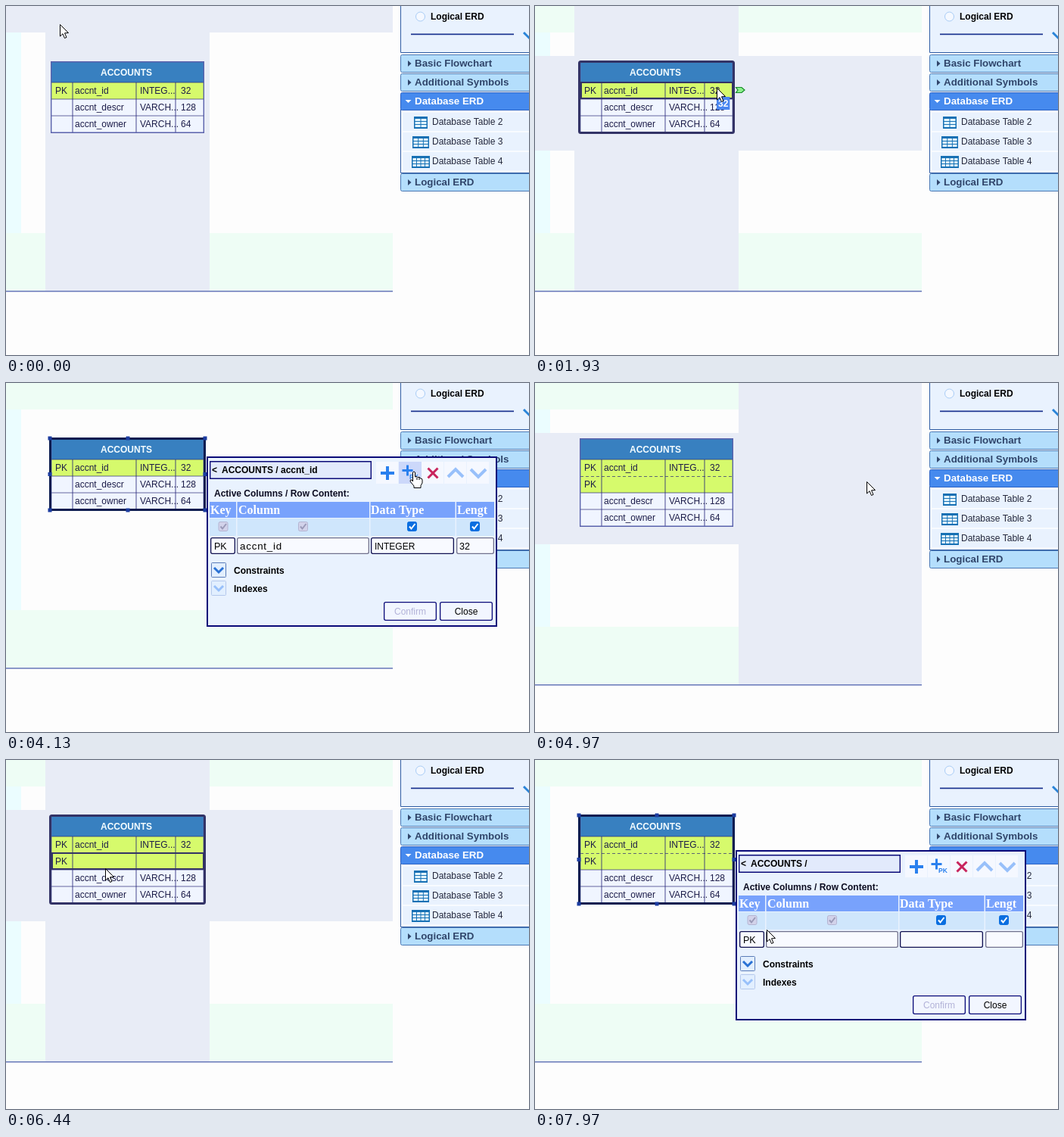
Recreate the animation shown at these times as an HTML page with a canvas. Size 691x461 px, loop 8000 ms.

```html
<!DOCTYPE html>
<html lang="en">
<head>
<meta charset="utf-8">
<title>Table editor</title>
<style>
html, body { margin: 0; width: 100%; height: 100%; overflow: hidden; background: #fdfdfd; }
canvas { display: block; }
</style>
</head>
<body>
<canvas id="stage" width="691" height="461"></canvas>
<script>
const ctx = document.getElementById('stage').getContext('2d');
const LOOP = 8000;
const SANS = '"Liberation Sans", Arial, sans-serif';
const SERIF = '"Liberation Serif", "Times New Roman", serif';
const NAVY = '#0a0a78', BLUE = '#2a80ee', FADED = '#98c0fa', PANEL = '#e9f2fe';
const WHITE = '#fdfdfd', MARGIN = '#eefdf5', SIDE = '#ebfdff', LANE = '#e8ecf6';
const GRID = 'rgba(40, 40, 120, .7)', OUTLINE = '#333366', TRIM = '#2f5ca4';

// time, x, y of the pointer tip
const PATH = [
  [0, 71, 24], [500, 80, 27], [1000, 140, 55], [1500, 232, 104], [1930, 240, 108],
  [2520, 240, 108], [2970, 366, 116], [3250, 370, 116], [3900, 537, 117], [4130, 539, 117],
  [4700, 539, 119], [5500, 160, 159], [5640, 153, 157], [6050, 153, 157], [6650, 123, 138],
  [7480, 123, 138], [7970, 306, 224]
];
const OPEN_1 = 2540, INSERT = 4380, OPEN_2 = 6850;
const COLS = [60, 88, 172, 224, 261];
const TEXT_X = [65, 91, 177, 231];
const ROWS = [
  ['PK', 'accnt_id', 'INTEG...', '32'],
  ['', 'accnt_descr', 'VARCH...', '128'],
  ['', 'accnt_owner', 'VARCH...', '64']
];
const NEW_ROW = ['PK', '', '', ''];

function fill(x1, y1, x2, y2, color) {
  ctx.fillStyle = color;
  ctx.fillRect(x1, y1, x2 - x1, y2 - y1);
}

function box(x1, y1, x2, y2, bg, border, radius = 0, width = 1) {
  ctx.beginPath();
  ctx.roundRect(x1 + width / 2, y1 + width / 2, x2 - x1 - width, y2 - y1 - width, radius);
  if (bg) { ctx.fillStyle = bg; ctx.fill(); }
  ctx.strokeStyle = border;
  ctx.lineWidth = width;
  ctx.stroke();
}

function text(str, x, y, color, { size = 12, bold = false, family = SANS, align = 'left', spacing = 0 } = {}) {
  ctx.font = `${bold ? 'bold ' : ''}${size}px ${family}`;
  ctx.textAlign = align;
  ctx.letterSpacing = spacing + 'px';
  ctx.fillStyle = color;
  ctx.fillText(str, x, y);
}

function line(points, color, width, dash = []) {
  ctx.beginPath();
  points.forEach(([x, y]) => ctx.lineTo(x, y));
  ctx.strokeStyle = color;
  ctx.lineWidth = width;
  ctx.setLineDash(dash);
  ctx.stroke();
  ctx.setLineDash([]);
}

function shape(points, bg, border, width = 1) {
  ctx.beginPath();
  points.forEach(([x, y]) => ctx.lineTo(x, y));
  ctx.closePath();
  ctx.fillStyle = bg;
  ctx.fill();
  if (border) {
    ctx.strokeStyle = border;
    ctx.lineWidth = width;
    ctx.stroke();
  }
}

function pointerAt(t) {
  const i = PATH.findIndex(p => p[0] > t);
  if (i < 0) return PATH[PATH.length - 1].slice(1);
  const [t0, x0, y0] = PATH[i - 1], [t1, x1, y1] = PATH[i];
  const k = (t - t0) / (t1 - t0), e = k * k * (3 - 2 * k);
  return [x0 + (x1 - x0) * e, y0 + (y1 - y0) * e];
}

const inside = (x, y, x1, y1, x2, y2) => x >= x1 && x < x2 && y >= y1 && y < y2;
const span = (stops, v) => stops.findIndex((s, i) => v >= s && v < stops[i + 1]);

function drawPage(grow, x, y, lit) {
  const bottom = 376 + grow;
  fill(0, 0, 691, 461, WHITE);
  fill(0, 0, 511, bottom, MARGIN);
  fill(0, 35, 20, 300 + grow, SIDE);
  fill(20, 35, 511, 300 + grow, WHITE);
  if (lit) {
    const xs = [0, 20, 52, 269, 511], ys = [0, 35, 66, 191 + grow, 300 + grow, bottom];
    const c = span(xs, x), r = span(ys, y);
    if (c >= 0 && r >= 0) {
      fill(0, ys[r], 511, ys[r + 1], LANE);
      fill(xs[c], 0, xs[c + 1], bottom, LANE);
    }
  }
  fill(0, bottom, 511, bottom + 1.6, '#6f7fbd');
}

function drawTable(rows, x, y, hover, selected) {
  const end = 101 + rows.length * 22;
  fill(60, 74, 262, end, '#f0f5ff');
  fill(60, 74, 262, 101, '#3880c0');
  text('ACCOUNTS', 159, 92, '#f4fcff', { bold: true, align: 'center' });
  rows.forEach((row, i) => {
    const top = 101 + i * 22;
    if (row[0]) fill(60, top, 262, top + 22, '#d6fa6c');
  });
  COLS.slice(1, 4).forEach(c => line([[c, 101], [c, end]], GRID, 1.2));
  rows.forEach((row, i) => {
    const top = 101 + i * 22;
    if (i && row[0]) line([[60, top + .5], [262, top + .5]], GRID, 1, [4, 3]);
    else line([[60, top], [262, top]], GRID, 1.2);
    row.forEach((s, c) => text(s, TEXT_X[c], top + 15, '#1c1c48'));
  });
  box(59, 73, 262, end + 1, null, '#5a62ac', 0, 1.4);

  if (selected) {
    box(57, 72, 264, end + 2, null, '#0c1c50', 0, 3);
    const mid = (73 + end + 1) / 2;
    for (const hx of [58, 161, 263]) {
      for (const hy of [73, mid, end + 1]) {
        if (hx !== 161 || hy !== mid) fill(hx - 2.5, hy - 2.5, hx + 2.5, hy + 2.5, '#1c3ca0');
      }
    }
  }
  if (!hover) return;
  box(57, 72, 264, end + 2, null, OUTLINE, 2, 3);
  const r = Math.floor((y - 101) / 22), c = span(COLS, x);
  if (!rows[r]) return;
  const top = 101 + r * 22;
  box(60, top - 1, 262, top + 22, null, OUTLINE, 0, 2);
  if (r === 0) {
    shape([[265.5, 107.5], [273, 107.5], [277, 111], [273, 114.5], [265.5, 114.5], [268, 111]], '#8cf08c', '#168a28', 1.2);
  }
  if (c >= 0 && rows[r][c]) {
    const left = COLS[c] + 16;
    ctx.font = 'bold 12px ' + SANS;
    ctx.letterSpacing = '0px';
    const w = ctx.measureText(rows[r][c]).width;
    fill(left, top + 19, left + w + 4, top + 36, '#4a86f0');
    text(rows[r][c], left + 2, top + 32, '#fff', { bold: true });
  }
}

function drawAccordion(label, y, open) {
  box(521, y, 700, y + 24, open ? '#468aee' : '#b4defc', open ? '#2c62c4' : '#4a78b4', 2);
  const ink = open ? '#fff' : '#30456a', m = y + 12;
  shape(open ? [[527.5, m - 2], [535.5, m - 2], [531.5, m + 2]]
             : [[531, m - 4], [535.5, m], [531, m + 4]], ink);
  text(label, 540, y + 16, ink, { size: 13.33, bold: true });
}

function drawSidebar() {
  box(521, -5, 700, 62, PANEL, TRIM);
  ctx.beginPath();
  ctx.arc(547.5, 14, 6, 0, 7);
  ctx.fillStyle = '#f4f8ff';
  ctx.fill();
  ctx.strokeStyle = '#a8ccf6';
  ctx.lineWidth = 1;
  ctx.stroke();
  text('Logical ERD', 561, 18, '#000', { bold: true });
  fill(535, 36.5, 671, 38.2, '#1c3490');
  line([[684, 35], [693, 44]], '#2a84d8', 3);

  box(521, 136, 700, 221, '#f8fbff', TRIM);
  drawAccordion('Basic Flowchart', 64);
  drawAccordion('Additional Symbols', 89);
  drawAccordion('Database ERD', 114, true);
  drawAccordion('Logical ERD', 221);
  for (let n = 2; n <= 4; n++) {
    const y = 153 + (n - 2) * 26, w = [18, 22, 24][n - 2], left = 548 - w / 2;
    fill(524, y - 12, 691, y + 12, PANEL);
    fill(left, y - 7, left + w, y + 9, '#1670b4');
    const cell = (w - 2 - n) / n;
    for (let c = 0; c < n; c++) {
      for (let r = 0; r < 3; r++) {
        const cx = left + 1.5 + c * (cell + 1), cy = y - 4 + r * 4;
        fill(cx, cy, cx + cell, cy + 3, '#e4f6ff');
      }
    }
    text('Database Table ' + n, 563, y + 4, '#24283c');
  }
}

function chevron(x, y, w, dir, color, width) {
  line([[x - w, y - w / 2 * dir], [x, y + w / 2 * dir], [x + w, y - w / 2 * dir]], color, width);
}

function plus(x, y, r, w) {
  fill(x - r, y - w / 2, x + r, y + w / 2, BLUE);
  fill(x - w / 2, y - r, x + w / 2, y + r, BLUE);
}

function checkbox(x, y, active) {
  box(x - 6.5, y - 6.5, x + 6.5, y + 6.5, active ? '#0a6ee0' : '#d2d2ea', active ? '#0a6ee0' : '#b4b4d2', 2);
  line([[x - 3.5, y], [x - 1, y + 3], [x + 4, y - 3.5]], active ? '#fff' : '#9a9ab8', 2);
}

function drawDialog(row, dy, hoverKey) {
  ctx.save();
  ctx.translate(0, dy);
  box(265, 97, 649, 322, PANEL, NAVY, 0, 2);
  box(269, 103, 483, 127, '#e2eafc', NAVY, 0, 1.4);
  text('<', 272, 119, '#000', { bold: true });
  text('ACCOUNTS / ' + row[1], 285, 119, '#000', { bold: true });

  for (let i = 0; i < 5; i++) fill(489 + i * 30, 104, 518 + i * 30, 133, '#f5f8ff');
  if (hoverKey) fill(519, 104, 549, 133, '#ccd8fa');
  plus(504, 119, 9, 4);
  plus(530.5, 115.5, 7, 3);
  text('PK', 533, 127, BLUE, { size: 8.5, bold: true });
  line([[557.5, 112.5], [570.5, 125.5]], '#c8245c', 3);
  line([[570.5, 112.5], [557.5, 125.5]], '#c8245c', 3);
  chevron(594, 119, 10, -1, FADED, 4);
  chevron(624, 119, 10, 1, FADED, 4);

  text('Active Columns / Row Content:', 275, 150, '#0c0c20', { bold: true });
  fill(269, 157, 645, 178, '#78a2fc');
  fill(269, 179, 645, 202, '#cfe6fc');
  [304, 480, 593.5].forEach(x => fill(x, 157, x + 1.5, 202, PANEL));
  [['Key', 270], ['Column', 307], ['Data Type', 482], ['Lengt', 596]].forEach(
    ([s, x]) => text(s, x, 173, '#fff', { size: 16, bold: true, family: SERIF }));
  [287, 392.5, 536.5, 619.5].forEach((x, i) => checkbox(x, 189.5, i > 1));

  const fields = [
    [270, 303, row[0], 275], [305, 480, row[1], 309],
    [482, 592, row[2] && 'INTEGER', 487], [595, 645, row[3], 599]
  ];
  fields.forEach(([x1, x2, s, tx], i) => {
    box(x1, 204, x2, 226, '#f8faff', i % 2 ? '#70708c' : '#101050', 2, 1.3);
    text(s, tx, 219.5, '#000', i === 1 ? { size: 13.33, spacing: .8 } : { size: i === 2 ? 12 : 12.5 });
  });

  [['Constraints', 237, '#2a72d4', '#5a7cb8'], ['Indexes', 261, FADED, '#b4c8ec']].forEach(([s, y, ink, edge]) => {
    box(271, y, 291, y + 20, '#e2efff', edge, 1);
    chevron(281, y + 10, 6, 1, ink, 3);
    text(s, 301, y + 15, '#000', { bold: true });
  });
  [['Confirm', 499, '#b2b2d8'], ['Close', 573, '#000']].forEach(([s, x, ink]) => {
    box(x, 289, x + 70, 314, '#f2f6ff', NAVY, 2, 1.3);
    text(s, x + 35, 306, ink, { align: 'center' });
  });
  ctx.restore();
}

function drawArrow() {
  shape([[.5, .5], [.5, 16], [4, 12.7], [6.5, 18.5], [9, 17.4], [6.5, 11.8], [11.5, 11.5]], '#fff', '#000');
}

function drawBeam() {
  line([[-3, -7.5], [-1, -7.5], [0, -6.5], [0, 6.5], [-1, 7.5], [-3, 7.5]], '#000', 1.2);
  line([[3, -7.5], [1, -7.5], [0, -6.5], [0, 6.5], [1, 7.5], [3, 7.5]], '#000', 1.2);
}

function drawHand() {
  shape([[-1.5, 1], [0, 0], [1.5, 1], [1.5, 7], [4, 6.5], [5, 7.5], [7.5, 7.5], [8.5, 9], [10.5, 9.5],
    [11, 11], [11, 15], [9, 18.5], [9, 21.5], [0, 21.5], [0, 19], [-5, 13], [-4.5, 11], [-3, 11], [-1.5, 13]],
    '#fff', '#000');
  [4, 7].forEach(x => line([[x, 7.5], [x, 11]], '#000', 1));
}

function drawPointer(x, y, kind) {
  ctx.save();
  ctx.translate(Math.round(x), Math.round(y));
  ({ arrow: drawArrow, beam: drawBeam, hand: drawHand })[kind]();
  ctx.restore();
}

function draw(t) {
  const [x, y] = pointerAt(t);
  const grown = t >= INSERT;
  const rows = grown ? [ROWS[0], NEW_ROW, ROWS[1], ROWS[2]] : ROWS;
  const grow = grown ? 22 : 0;
  const open = (t >= OPEN_1 && !grown) || t >= OPEN_2;
  const inDialog = open && inside(x, y, 265, 97 + grow, 649, 322 + grow);
  const onTable = inside(x, y, 58, 73, 264, 102 + rows.length * 22);
  const onKey = inDialog && inside(x, y, 519, 104 + grow, 549, 133 + grow);

  let kind = 'arrow';
  if (inDialog) {
    if (inside(x, y, 489, 104 + grow, 640, 133 + grow)) kind = 'hand';
    else if (inside(x, y, 269, 103 + grow, 483, 127 + grow)) kind = 'beam';
  }

  drawPage(grow, x, y, !inDialog);
  drawSidebar();
  drawTable(rows, x, y, onTable && !open, open);
  if (open) drawDialog(rows[grown ? 1 : 0], grow, onKey);
  drawPointer(x, y, kind);
}

function tick() {
  draw(performance.now() % LOOP);
  requestAnimationFrame(tick);
}
tick();
</script>
</body>
</html>
```
